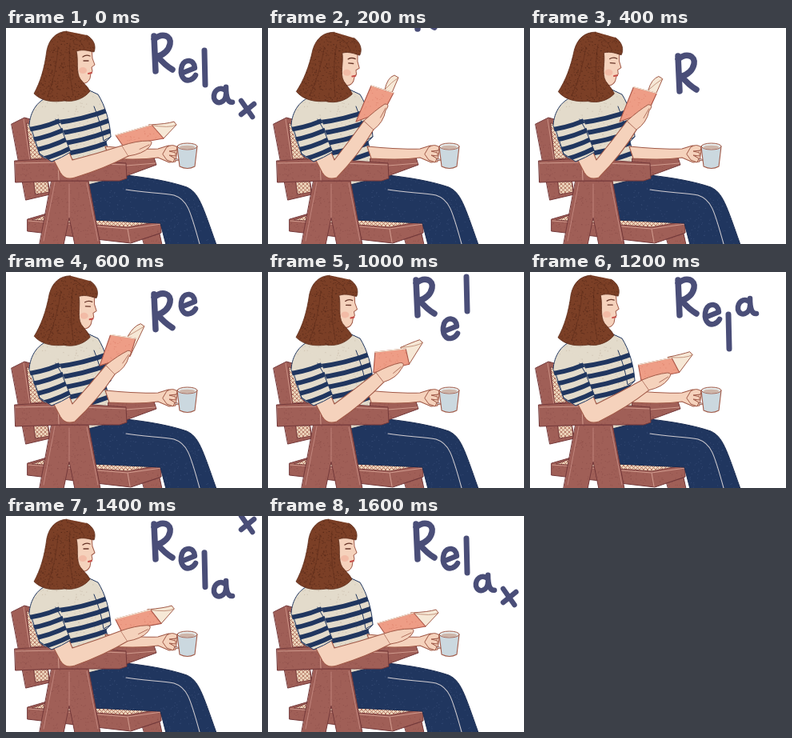
Animation, 320 px wide and 270 px high, one loop 2000 ms. Source, as an HTML page with a canvas:

```html
<!DOCTYPE html>
<html lang="en">
<head>
<meta charset="utf-8">
<title>Relax</title>
<style>
html, body { margin: 0; width: 100%; height: 100%; overflow: hidden; background: #fff; }
canvas { display: block; width: 320px; height: 270px; }
</style>
</head>
<body>
<canvas id="stage" width="320" height="270"></canvas>
<script>
const ctx = document.getElementById('stage').getContext('2d');
ctx.lineJoin = ctx.lineCap = 'round';

const W = 320, H = 270, STEP = 200, LOOP = 2000, LAST = 8;
const INK = '#a15a48', SKIN = '#f5d2bc', WOOD = '#a05f57', EDGE = '#74393a', SHINE = '#d09a8d';
const NAVY = '#20365f', SHIRT = '#e3dbcb', CORAL = '#ee9d86', PAGE = '#f6e8d6';
const HAIR = '#7b3f26', LETTER = '#4a4e78';

function shape(d, fill, stroke, width = 1) {
  const path = new Path2D(d);
  if (fill) { ctx.fillStyle = fill; ctx.fill(path); }
  if (stroke) { ctx.strokeStyle = stroke; ctx.lineWidth = width; ctx.stroke(path); }
  return path;
}
const line = (d, color, width = 1) => shape(d, null, color, width);

function within(path, draw) {
  ctx.save();
  ctx.clip(path);
  draw();
  ctx.restore();
}

// Repeatable speckles give the surfaces a crayon grain.
function grain(path, color, density) {
  let seed = 7919;
  const rnd = () => (seed = (seed * 16807) % 2147483647) / 2147483647;
  within(path, () => {
    ctx.fillStyle = color;
    for (let i = 0; i < W * H * density; i++) ctx.fillRect(rnd() * W, rnd() * H, 1.2, 1);
  });
}

function wood(d) {
  grain(shape(d, WOOD, EDGE), 'rgba(116,57,58,.28)', 0.04);
}

function cane(d, x, y, w, h) {
  within(shape(d, '#eed7bd', EDGE), () => {
    for (let k = -h; k < w + h; k += 5) {
      line(`M${x + k} ${y}l${h} ${h}M${x + k} ${y}l${-h} ${h}`, '#b0705f', 0.9);
    }
  });
}

function stripes(path, left, right, top, rise) {
  within(path, () => {
    for (let y = top; y < 200; y += 13.5) {
      line(`M${left} ${y}Q${(left + right) / 2} ${y - rise / 2 + 5} ${right} ${y - rise}`, NAVY, 5.8);
    }
  });
}

function chairBack() {
  wood('M7 120L23 112 41 117 55 208 25 215Z');
  cane('M26 119L37 121 45 163 31 164Z', 24, 118, 24, 48);
  cane('M35 192L52 192 54 205 37 208Z', 34, 190, 20, 20);
  line('M22 114L30 166', '#c98f83');
}

function seat() {
  wood('M27 239L51 232 112 240 194 244 194 256 156 269 27 254Z');
  cane('M50 234L108 239 185 243 152 249 33 240Z', 30, 232, 156, 18);
  line('M28 241L152 251 194 245M152 251L155 268', SHINE, 1.1);
  wood('M171 264L192 257 195 271 173 271Z');
}

function torso() {
  const body = shape('M60 84C39 88 30 105 29 122L42 158 58 170 105 202 137 190 131 166 125 142 131 136C130 118 124 97 115 83L100 76Z', SHIRT, NAVY);
  grain(body, 'rgba(150,125,100,.25)', 0.025);
  stripes(body, 59, 132, 119, 18);
  line('M110 98Q119 120 122 141L131 136', NAVY);
}

function farArm() {
  wood('M128 163L185 162 188 171 150 185 128 180Z');
  line('M150 172L187 169', SHINE);
  shape('M124 148C146 150 171 152 190 151L203 147 210 148 214 153 212 167 204 168 190 162C170 165 146 164 129 163Z', SKIN, INK, 1.1);
}

function trousers() {
  const legs = shape('M103 196L150 184C178 187 206 192 226 199 241 206 245 220 263 271L200 271 193 244 108 240Z', NAVY, '#1a2b50');
  grain(legs, 'rgba(120,140,185,.2)', 0.025);
  line('M150 202C174 206 195 206 210 209 226 214 230 226 242 270', '#cfcbd0', 1.1);
}

function cup() {
  line('M211 153C202 150 201 163 215 165', INK, 2.6);
  line('M211 153C202 150 201 163 215 165', '#ccd9e0', 1.2);
  shape('M201 149Q208 144 214 149L213 153 204 154 212 156 212 160 204 159 211 163 209 168 201 165 196 158Z', SKIN, INK);
  shape('M214 148L217 173Q227 178 236 173L239 148Z', '#cbd8df', INK, 1.1);
  shape('M214 148a12.5 4 0 0 0 25 0a12.5 4 0 0 0 -25 0Z', '#e5e9e9', INK);
  shape('M217 149a9.5 2.3 0 0 0 19 0a9.5 2.3 0 0 0 -19 0Z', '#cdb5a9');
}

function chairFront() {
  wood('M57 191L103 191 118 271 86 271 79 237 72 271 42 271Z');
  line('M79 195L79 237M61 193L47 266M101 194L115 266', '#c48a80', 0.9);
  wood('M11 166L65 163 150 169 151 188 142 191 66 191 12 193Z');
  line('M12 169L65 168 149 171M65 168L66 190', SHINE);
}

// Moves a point from the raised to the lowered pose along a shallow arc.
function mover(progress) {
  const lift = 10 * Math.sin(Math.PI * progress);
  return (x0, y0, x1, y1) => [x0 + (x1 - x0) * progress, y0 + (y1 - y0) * progress - lift];
}

function nearArm(at) {
  const [tx, ty] = at(120, 116, 145, 147), [bx, by] = at(132, 127, 153, 160);
  shape(`M57 160L68 181Q74 191 86 187Q${(86 + bx) / 2 + 4} ${(187 + by) / 2 + 2} ${bx} ${by}L${tx} ${ty}Q${(83 + tx) / 2} ${(163 + ty) / 2 + 2} 83 165L78 153Z`, SKIN, INK, 1.1);
  const sleeve = shape('M44 99C32 105 29 117 30 127L42 157 57 167Q70 162 81 155L74 138Q69 115 60 103Z', SHIRT);
  stripes(sleeve, 28, 82, 127, 18);
  line('M31 124L42 157 57 167Q70 162 81 155L74 138Q69 124 62 114', NAVY);
}

function book(at) {
  const spine = at(110, 117, 146, 147), top = at(129, 72, 137, 134);
  const corner = at(157, 81, 182, 121), foot = at(145, 104, 197, 138);
  const gutter = at(146, 77, 179, 121), tip = at(158, 59, 210, 117), edge = at(163, 62, 213, 121);
  shape(`M${gutter}Q${tip[0] - 9} ${tip[1] + 3} ${tip}L${edge}L${foot}Z`, PAGE, INK);
  line(`M${gutter}Q${edge[0] - 8} ${edge[1] + 5} ${edge}`, '#b98069', 0.8);
  const face = shape(`M${spine}L${top}L${corner}L${foot}Z`, CORAL, '#ab5648', 1.1);
  grain(face, 'rgba(205,100,80,.3)', 0.03);
  line(`M${top}L${corner}`, PAGE, 1.2);
}

function hand(at) {
  const [tx, ty] = at(120, 116, 145, 147), [bx, by] = at(132, 127, 153, 160);
  const [x, y] = at(149, 97, 181, 143);
  const mx = (bx + x) / 2, my = (by + y) / 2;
  const outline = `M${tx} ${ty}Q${(tx + x) / 2} ${(ty + y) / 2 - 4} ${x - 3} ${y - 2}Q${x + 3} ${y - 2} ${x} ${y + 3}L${x - 2} ${y + 6}Q${mx + 4} ${my + 6} ${bx} ${by}`;
  shape(outline, SKIN, INK);
  line(`M${x - 2} ${y + 3}L${mx} ${my}`, INK, 0.8);
}

function head(tilt) {
  ctx.save();
  ctx.translate(65, 85);
  ctx.rotate(tilt * Math.PI / 180);
  ctx.translate(-65, -85);
  shape('M82 24L107 24 108 38 111 46 107 49 108 54 106 57 105 63Q102 70 95 69L85 76Z', SKIN, INK);
  shape('M91 53a5 4 0 0 0 10 0a5 4 0 0 0 -10 0Z', 'rgba(238,145,125,.35)');
  line('M97 41L103 41M96 36Q100 33 105 35', '#673528', 1.3);
  line('M103 57L107 56', '#c64c46', 2);
  const hair = shape('M76 4C62 5 54 14 51 28 48 51 43 67 35 82 45 92 59 93 73 91 85 93 98 88 105 79 102 73 97 69 93 64 87 55 91 40 88 29 97 26 104 29 110 30 113 23 110 14 101 9 93 4 76 4Z', HAIR, '#60301f', 0.8);
  grain(hair, 'rgba(60,25,15,.4)', 0.09);
  line('M76 7Q91 11 98 25M80 19Q77 48 84 84M65 24Q63 56 52 86', 'rgba(70,30,18,.4)', 0.8);
  ctx.restore();
}

const letters = [
  { enter: 1, from: -53, w: 7.5, d: 'M185 10L187 54M185 14C196 5 207 10 205 20 203 30 195 34 188 36M190 36Q198 46 208 52' },
  { enter: 3, from: -13, w: 6.5, d: 'M221 56L236 50C235 39 224 38 220 47 216 60 223 67 230 65Q235 63 237 59' },
  { enter: 5, from: -22, w: 7, d: 'M248 28L249 71' },
  { enter: 6, from: -23, w: 6.5, d: 'M275 61C267 54 259 61 260 70 263 80 275 75 275 65M275 56Q275 76 283 75' },
  { enter: 7, from: -66, w: 6.5, d: 'M294 66L308 86M310 70L294 83' }
];

// A letter drops in, overshoots downward, then rises to rest at age three.
function word(step) {
  for (const { enter, from, w, d } of letters) {
    const age = step - enter;
    if (age < 0) continue;
    const sink = 25 * Math.cos((Math.min(age, 3) - 1) * Math.PI / 4);
    ctx.save();
    ctx.translate(0, age ? sink : from);
    line(d, LETTER, w);
    ctx.restore();
  }
}

function draw(step) {
  const t = (step - 1) / (LAST - 1);
  const lowered = t * t * (3 - 2 * t);
  const at = mover(lowered);
  ctx.fillStyle = '#fff';
  ctx.fillRect(0, 0, W, H);
  word(step);
  chairBack();
  seat();
  torso();
  trousers();
  farArm();
  cup();
  chairFront();
  nearArm(at);
  book(at);
  hand(at);
  head(5 * (1 - lowered) ** 2);
}

let shown = 0;
function tick() {
  const slot = Math.floor(performance.now() % LOOP / STEP);
  const step = Math.min(LAST, slot || LAST);
  if (step !== shown) draw(shown = step);
  requestAnimationFrame(tick);
}
tick();
</script>
</body>
</html>
```
